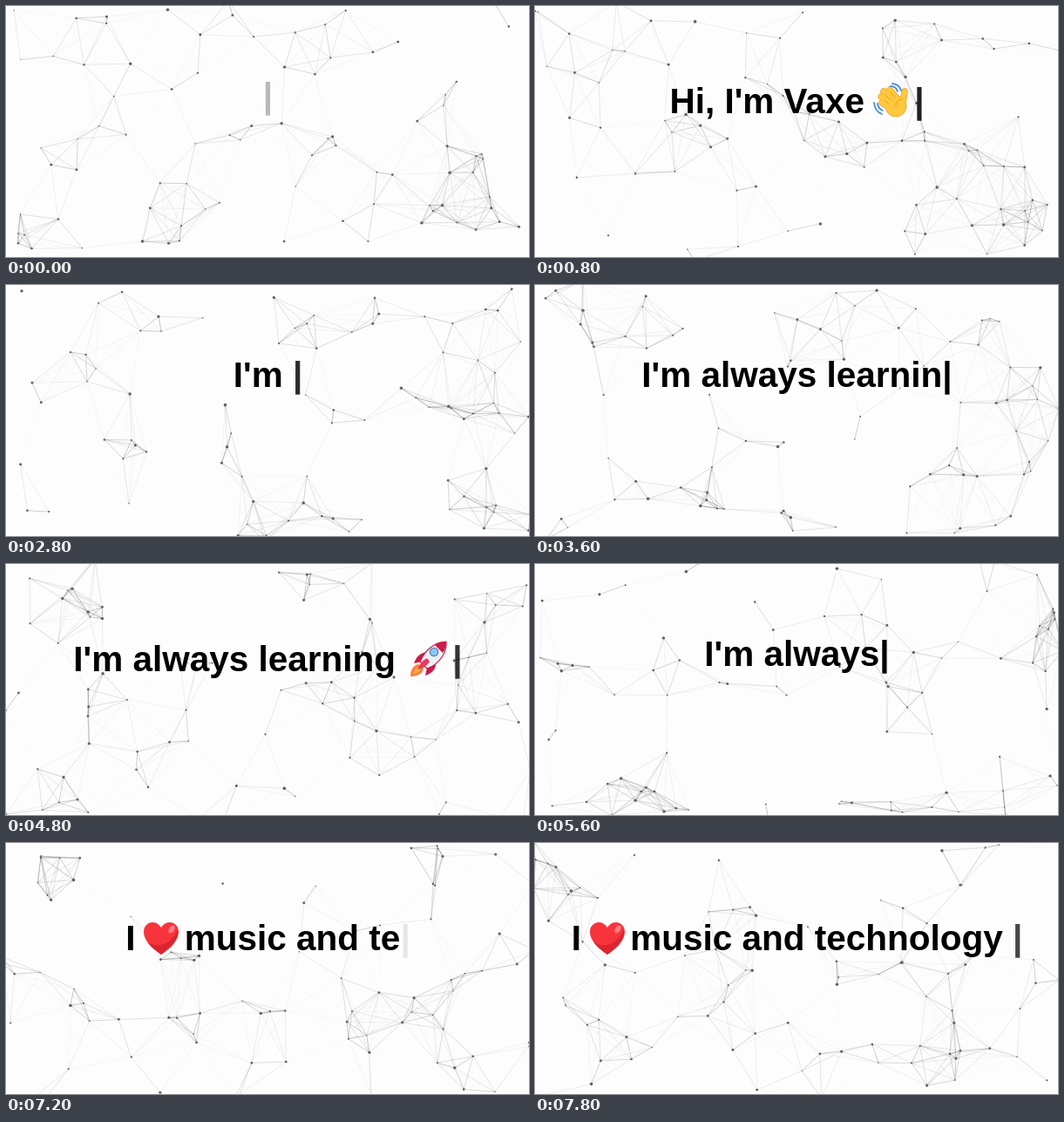
Animation, 600 px wide and 288 px high, one loop 8 s. Source, as an HTML page with a canvas:

```html
<!DOCTYPE html>
<html lang="en">
<head>
<meta charset="utf-8">
<title>Typed greeting</title>
<style>
  html, body { margin: 0; width: 100%; height: 100%; overflow: hidden; background: #fefdfe; }
  #stage { position: relative; width: 600px; height: 288px; overflow: hidden; }
  canvas { position: absolute; left: 0; top: 0; }
  #line {
    position: absolute; left: 0; width: 601px; text-align: center; white-space: pre;
    font: bold 40.5px/46px "Liberation Sans", Arial, sans-serif; color: #000;
  }
  .icon { display: inline-block; position: relative; height: 0; }
  .icon svg { position: absolute; overflow: visible; }
</style>
</head>
<body>
<div id="stage">
  <canvas id="net" width="600" height="288"></canvas>
  <div id="line"><span id="text"></span><span id="cursor">|</span></div>
</div>
<script>
const LOOP = 8000, STEP = 200, W = 600, H = 288;
const CHARS_PER_STEP = 3.5;

const icon = (advance, dx, top, art) =>
  `<span class="icon" style="width:${advance}px"><svg width="44" height="42" style="left:${dx}px;top:${top}px">${art}</svg></span>`;

const wave = icon(46, -1, -35, `
  <g fill="none" stroke-linecap="round">
    <g stroke="#e9a01f" stroke-width="7.4"><path d="M20 29L10 23M22 25L9 16M25 21L12 10M29 20L19 8M34 24L36 10"/></g>
    <circle cx="26" cy="27" r="12" fill="#ffc83d" stroke="#e9a01f" stroke-width=".8"/>
    <g stroke="#ffc83d" stroke-width="6.2"><path d="M21 29L10 23M23 25L9 16M26 21L12 10M29 20L19 8M34 24L36 10"/></g>
    <path d="M17 24L12 20M20 20L14 14M25 17L20 11M33 19Q25 20 26 27" stroke="#e9a01f"/>
    <path d="M22 1Q30 2 32 9M20 4Q26 4 28 10M1 23Q2 33 10 36M5 24Q6 30 11 32" stroke="#4b8fdc" stroke-width="1.8"/>
  </g>`);

const rocket = icon(54, 5, -35, `
  <path d="M10 27C4 28 1 34 1 41C8 41 15 38 16 32Z" fill="#ff7d3b"/>
  <path d="M10 30Q5 33 4 38Q10 37 13 33Z" fill="#ffb04a"/>
  <path d="M21 13C13 13 8 18 5 26L14 24ZM30 24C31 31 27 37 18 40L20 31Z" fill="#cc1b48"/>
  <path d="M42 1C30 1 18 10 12 24L20 32C34 27 43 14 42 1Z" fill="#eef1f5" stroke="#cc1b48" stroke-width="1.2"/>
  <path d="M42 1C37 1 32 3 29 5L38 14C41 10 42 5 42 1Z" fill="#cc1b48"/>
  <path d="M20 20Q13 23 9 33Q19 31 23 24Z" fill="#e83a5d"/>
  <circle cx="28" cy="13" r="4.6" fill="#8fc4f2" stroke="#4f83bd" stroke-width="1.4"/>`);

const heart = icon(45, -1.5, -32, `
  <path d="M20 37C8 29 0 20 0 11C0 4 5 0 10 0C15 0 18 3 20 6C22 3 25 0 30 0C35 0 40 4 40 11C40 20 32 29 20 37Z" fill="#f7343c"/>
  <path d="M39 8C41 20 31 29 20 37C12 31 7 27 4 22C16 31 32 25 39 8Z" fill="#dc2431"/>
  <ellipse cx="32" cy="8" rx="3" ry="5" fill="#ff7f84" transform="rotate(32 32 8)"/>`);

// start and erase are counted in steps
const lines = [
  { start: 0, erase: 8.55, glyphs: [..."Hi, I'm Vaxe ", wave] },
  { start: 12.8, erase: 24.6, glyphs: [..."I'm always learning ", rocket] },
  { start: 31.7, erase: 99, glyphs: [..."I ", heart, ..."music and technology "] }
];

function seeded(seed) {
  return () => {
    seed = (seed + 0x6d2b79f5) | 0;
    let mixed = Math.imul(seed ^ (seed >>> 15), seed | 1);
    mixed ^= mixed + Math.imul(mixed ^ (mixed >>> 7), mixed | 61);
    return ((mixed ^ (mixed >>> 14)) >>> 0) / 4294967296;
  };
}
const random = seeded(41);
const dots = Array.from({ length: 84 }, () => {
  const angle = random() * Math.PI * 2, speed = 8 + random() * 26;
  return {
    x: random() * W, y: random() * H, r: 0.6 + random() * 1.2,
    vx: Math.cos(angle) * speed, vy: Math.sin(angle) * speed
  };
});

const wrap = (value, size) => ((value % size) + size) % size;
const ctx = document.getElementById("net").getContext("2d");
const line = document.getElementById("line");
const text = document.getElementById("text");

const blink = document.getElementById("cursor").animate(
  [0, 1, 0].map(opacity => ({ opacity, easing: "ease" })), { duration: 1000, iterations: Infinity });
blink.pause();

function drawNet(step) {
  const reach = 84, margin = 6;
  const points = dots.map(d => ({
    x: wrap(d.x + d.vx * step, W + 2 * margin) - margin,
    y: wrap(d.y + d.vy * step, H + 2 * margin) - margin,
    r: d.r
  }));
  ctx.clearRect(0, 0, W, H);
  ctx.lineWidth = 0.6;
  points.forEach((a, i) => {
    for (const b of points.slice(i + 1)) {
      const distance = Math.hypot(a.x - b.x, a.y - b.y);
      if (distance >= reach) continue;
      ctx.strokeStyle = `rgba(60,60,60,${0.62 * (1 - distance / reach) ** 1.2})`;
      ctx.beginPath();
      ctx.moveTo(a.x, a.y);
      ctx.lineTo(b.x, b.y);
      ctx.stroke();
    }
  });
  ctx.fillStyle = "#606060";
  for (const p of points) {
    ctx.beginPath();
    ctx.arc(p.x, p.y, p.r, 0, Math.PI * 2);
    ctx.fill();
  }
}

function drawText(step) {
  const { start, erase, glyphs } = lines.findLast(l => l.start <= step);
  const typed = Math.floor((step - start) * CHARS_PER_STEP);
  const left = Math.ceil(glyphs.length - (step - erase) * CHARS_PER_STEP);
  const shown = glyphs.slice(0, Math.max(0, Math.min(typed, left)));
  text.innerHTML = shown.join("");
  // an icon makes the line taller and lowers its baseline
  line.style.top = (shown.some(g => g.length > 1) ? 86 : 80) + "px";
  blink.currentTime = wrap(0.093 + 0.798 * step, 1) * 1000;
}

const began = performance.now();
let lastStep = -1;
function frame() {
  const step = Math.floor(((performance.now() - began) % LOOP) / STEP);
  if (step !== lastStep) {
    lastStep = step;
    drawNet(step);
    drawText(step);
  }
  requestAnimationFrame(frame);
}
frame();
</script>
</body>
</html>
```
